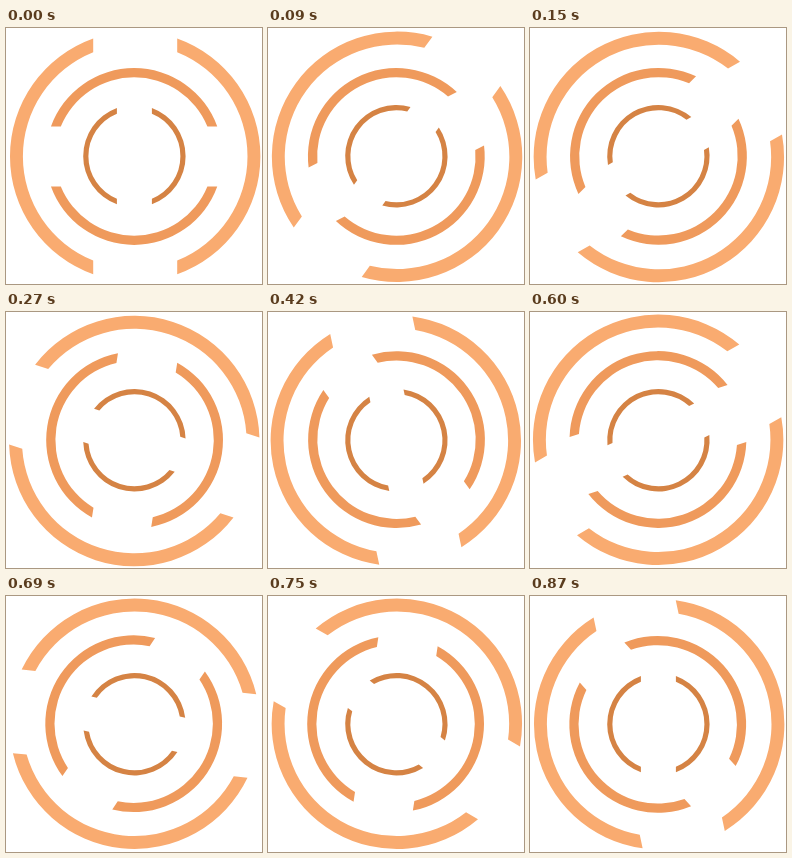
These frames come from a looping animation (256x256 px, 0.9 s). An HTML page:

```html
<!DOCTYPE html>
<html lang="en">
<head>
<meta charset="utf-8">
<title>Rings loader</title>
<style>
  html, body { margin: 0; width: 100%; height: 100%; overflow: hidden; background: #fff; }
  svg { display: block; width: 100%; height: 100%; }
</style>
</head>
<body>
<svg viewBox="0 0 256 256"></svg>
<script>
const LOOP = 900, STEP = 30, HALF = 15, LAST = 29;
const svg = document.querySelector('svg');

// Each ring turns evenly to `mid` at half time, then evenly to `end`.
// `off` is the small distance of the ring's centre from its pivot.
const rings = [
  { pivot: [128.5, 128.4], off: [0.7, 0], outer: 125.2, inner: 112.3, gap: 42, base: 0, mid: 180, end: 348, color: '#f9ab70' },
  { pivot: [128.1, 128], off: [0, 0.5], outer: 88.4, inner: 79.2, gap: 30, base: 90, mid: -135, end: -312, color: '#ef9a5c' },
  { pivot: [128.4, 128.2], off: [0, 0], outer: 51.2, inner: 46, gap: 17.5, base: 0, mid: 180, end: 360, color: '#d58344' }
];

// One side of a ring, cut by a straight line parallel to the gap.
function sidePath(r, side) {
  const x = side * r.gap;
  const yo = Math.sqrt(r.outer ** 2 - r.gap ** 2);
  const yi = Math.sqrt(r.inner ** 2 - r.gap ** 2);
  const sweep = side > 0 ? 1 : 0;
  return `M${x} ${-yo}A${r.outer} ${r.outer} 0 0 ${sweep} ${x} ${yo}` +
         `V${yi}A${r.inner} ${r.inner} 0 0 ${1 - sweep} ${x} ${-yi}Z`;
}

for (const r of rings) {
  r.el = document.createElementNS('http://www.w3.org/2000/svg', 'path');
  r.el.setAttribute('d', sidePath(r, 1) + sidePath(r, -1));
  r.el.setAttribute('fill', r.color);
  svg.append(r.el);
}

function angleAt(r, k) {
  return k <= HALF
    ? r.mid * k / HALF
    : r.mid + (r.end - r.mid) * (k - HALF) / (LAST - HALF);
}

function draw(ms) {
  const k = Math.floor((ms % LOOP) / STEP + 0.001);
  for (const r of rings) {
    r.el.setAttribute('transform',
      `translate(${r.pivot}) rotate(${angleAt(r, k)}) translate(${r.off}) rotate(${r.base})`);
  }
}

let start;
function tick(now) {
  start ??= now;
  draw(now - start);
  requestAnimationFrame(tick);
}
draw(0);
requestAnimationFrame(tick);
</script>
</body>
</html>
```
